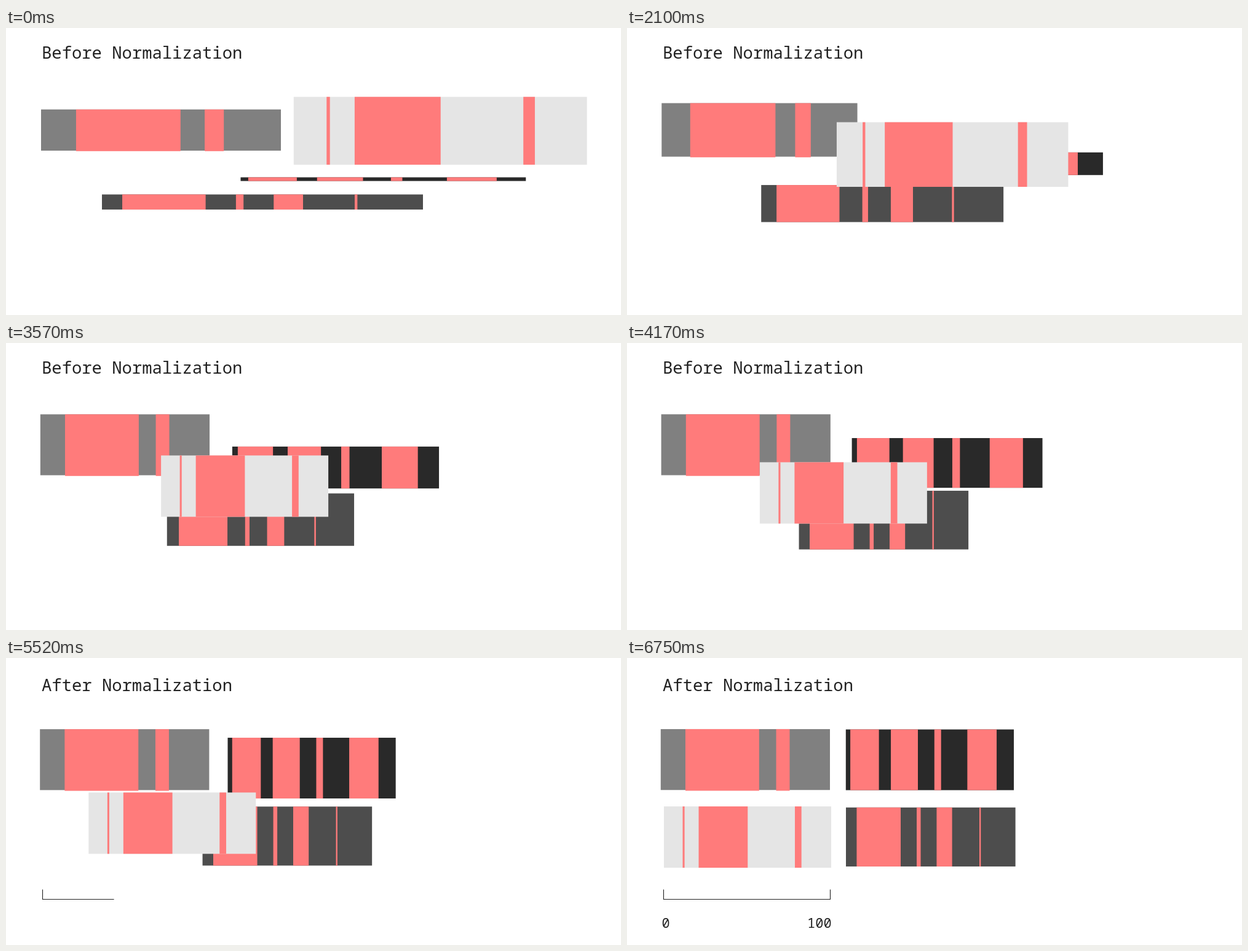
Write an HTML page that moves like this. It is 1000x468 px and loops after 8 s.

```html
<!DOCTYPE html>
<html lang="en">
<head>
<meta charset="utf-8">
<title>Normalization</title>
<style>
  html, body { margin: 0; width: 100%; height: 100%; overflow: hidden; background: #fff; }
  #stage { display: block; width: 100%; height: 100%; }
  #stage svg { overflow: visible; }
  text { font: 300 27.2px "Roboto Mono", "Noto Sans Mono", monospace; fill: #222; white-space: pre; }
  .label { font-size: 22px; }
  #bracket { fill: none; stroke: #222; stroke-width: 1.1; stroke-dasharray: 100 200; }
  .stripe { fill: #ff7b7b; }
</style>
</head>
<body>
<svg id="stage" viewBox="0 0 1000 468">
  <text id="before" x="58" y="50">Before Normalization</text>
  <text id="after" x="58" y="54">After Normalization</text>
  <g id="bars"></g>
  <path id="bracket" pathLength="100" d="M59.5 377.5V393.5H330.5V377.5"/>
  <text id="low" class="label" x="56.6" y="439.8">0</text>
  <text id="high" class="label" x="293" y="439.8">100</text>
</svg>
<script>
const LOOP = 8000, END = 6750, STEP = 30;
const SWAP = 5010, BRACKET_END = 6180, HIGH_AT = 6510;

// Each bar is anchored at its left middle, drifts at constant speed
// and is resized linearly within its own time span.
// stripes: [start, end] in percent of the bar's width
const bars = [
  { fill: '#808080', x: [57, 54.8], y: [166.4, 165.6], w: [390, 275.2], h: [67.2, 99.3],
    wSpan: [640, 2976], overhang: 1.2,
    stripes: [[14.6, 58.15], [68.22, 76.2]] },
  { fill: '#292929', x: [381.5, 355.8], y: [246.5, 172.25], w: [463.8, 273.2], h: [6, 99],
    wSpan: [650, 5010], lift: -6.25,
    stripes: [[2.67, 19.7], [26.8, 42.9], [52.7, 56.7], [72.32, 89.77]] },
  { fill: '#4d4d4d', x: [156, 356], y: [283.75, 291.85], w: [522, 275.6], h: [24.6, 96.2],
    wSpan: [0, 4040], hSpan: [0, 4200],
    stripes: [[6.33, 32.3], [41.74, 44.1], [53.5, 62.64], [78.73, 79.57]] },
  { fill: '#e5e5e5', x: [467.8, 60], y: [167.6, 292], w: [476.9, 272], h: [110.6, 100],
    wSpan: [1258, 2976],
    stripes: [[11.22, 12.35], [20.78, 50.1], [78.3, 82.23]] }
];

const byId = id => document.getElementById(id);
const progress = (t, [from, to]) => Math.min(1, Math.max(0, (t - from) / (to - from)));
const mix = ([a, b], p) => a + (b - a) * p;

function add(parent, tag, attrs) {
  const node = document.createElementNS('http://www.w3.org/2000/svg', tag);
  setAll(node, attrs);
  return parent.appendChild(node);
}

function setAll(node, attrs) {
  for (const name in attrs) node.setAttribute(name, attrs[name]);
}

for (const bar of bars) {
  bar.node = add(byId('bars'), 'svg', {});
  add(bar.node, 'rect', { width: '100%', height: '100%', fill: bar.fill });
  for (const [from, to] of bar.stripes) {
    add(bar.node, 'rect', {
      class: 'stripe', x: from + '%', width: to - from + '%', height: 100 + (bar.overhang || 0) + '%'
    });
  }
}

function show(id, visible) {
  byId(id).style.visibility = visible ? 'visible' : 'hidden';
}

function draw(now) {
  const t = Math.min(END, Math.floor(now % LOOP / STEP) * STEP);
  const drift = t / END;
  for (const bar of bars) {
    const wp = progress(t, bar.wSpan);
    const hp = progress(t, bar.hSpan || bar.wSpan);
    const height = mix(bar.h, hp);
    setAll(bar.node, {
      x: mix(bar.x, drift),
      y: mix(bar.y, drift) + (bar.lift || 0) * hp - height / 2,
      width: mix(bar.w, wp),
      height
    });
  }
  byId('bracket').style.strokeDashoffset = 100 * (1 - progress(t, [SWAP, BRACKET_END]));
  show('before', t < SWAP);
  show('after', t >= SWAP);
  show('bracket', t > SWAP);
  show('low', t >= BRACKET_END);
  show('high', t >= HIGH_AT);
}

function tick() {
  draw(performance.now());
  requestAnimationFrame(tick);
}
tick();
</script>
</body>
</html>
```
